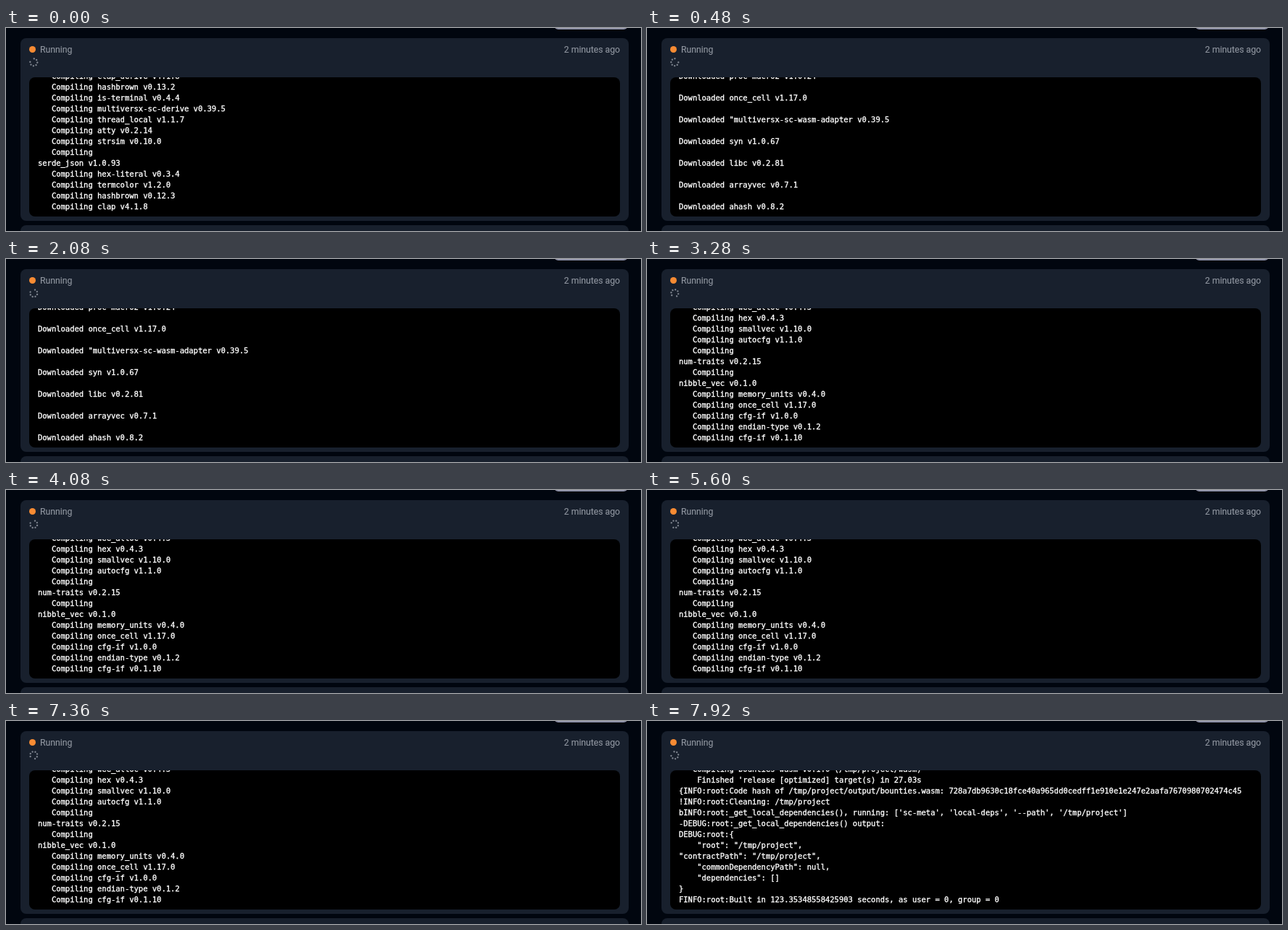
An HTML page that plays this animation: 876 by 280 pixels, repeating every 8000 ms.

```html
<!DOCTYPE html>
<html lang="en">
<head>
<meta charset="utf-8">
<title>Build log</title>
<style>
  html, body { margin: 0; width: 100%; height: 100%; overflow: hidden; background: #01060f; }
  body { position: relative; }
  div, svg, pre { position: absolute; }
  .card { left: 20px; width: 839px; border-radius: 8px; background: #18202d; }
  .label { top: 22px; font: 12.2px/16px Roboto, sans-serif; color: #8f959f; -webkit-text-stroke: .15px; white-space: nowrap; }
  .button { left: 756px; top: -24px; width: 102px; height: 26px; border-radius: 6px; background: #9193a8; }
  .dot { left: 31.8px; top: 24.6px; width: 9.6px; height: 9.6px; border-radius: 50%; background: #f78b33; }
  .terminal { left: 32px; top: 68px; width: 815px; height: 192px; border-radius: 8px; background: #000; overflow: hidden; }
  pre { left: 12px; bottom: 6px; margin: 0; font: 10.49px/15px "DejaVu Sans Mono", monospace; color: #fff; -webkit-text-stroke: .35px; }
</style>
</head>
<body>
<div class="button"></div>
<div class="card" style="top:14px;height:252px"></div>
<div class="card" style="top:272px;height:40px"></div>
<div class="dot"></div>
<div class="label" style="left:47px">Running</div>
<div class="label" style="right:29px">2 minutes ago</div>
<svg width="876" height="280" style="left:0;top:0"><g id="spinner" fill="#7d838e"></g></svg>
<div class="terminal"><pre id="log"></pre></div>
<script>
const LOOP = 8000, STEP = 80, TURN = 2000;
const spinner = document.getElementById('spinner');
const log = document.getElementById('log');

const compiling = items => items.map(s => s[0] === '>'
  ? '   Compiling\n' + s.slice(1)
  : '   Compiling ' + s).join('\n');
const downloaded = items => items.map(s => 'Downloaded ' + s).join('\n\n');

const screens = [
  [0, compiling(['clap_derive v4.1.8', 'hashbrown v0.13.2', 'is-terminal v0.4.4',
    'multiversx-sc-derive v0.39.5', 'thread_local v1.1.7', 'atty v0.2.14', 'strsim v0.10.0',
    '>serde_json v1.0.93', 'hex-literal v0.3.4', 'termcolor v1.2.0', 'hashbrown v0.12.3',
    'clap v4.1.8'])],
  [480, downloaded(['proc-macro2 v1.0.24', 'once_cell v1.17.0',
    '"multiversx-sc-wasm-adapter v0.39.5', 'syn v1.0.67', 'libc v0.2.81',
    'arrayvec v0.7.1', 'ahash v0.8.2'])],
  [3200, compiling(['wee_alloc v0.4.5', 'hex v0.4.3', 'smallvec v1.10.0', 'autocfg v1.1.0',
    '>num-traits v0.2.15', '>nibble_vec v0.1.0', 'memory_units v0.4.0', 'once_cell v1.17.0',
    'cfg-if v1.0.0', 'endian-type v0.1.2', 'cfg-if v0.1.10'])],
  [7520, `   Compiling bounties-wasm v0.1.0 (/tmp/project/wasm)
    Finished 'release [optimized] target(s) in 27.03s
{INFO:root:Code hash of /tmp/project/output/bounties.wasm: 728a7db9630c18fce40a965dd0cedff1e910e1e247e2aafa7670980702474c45
!INFO:root:Cleaning: /tmp/project
bINFO:root:_get_local_dependencies(), running: ['sc-meta', 'local-deps', '--path', '/tmp/project']
-DEBUG:root:_get_local_dependencies() output:
DEBUG:root:{
    "root": "/tmp/project",
"contractPath": "/tmp/project",
    "commonDependencyPath": null,
    "dependencies": []
}
FINFO:root:Built in 123.35348558425903 seconds, as user = 0, group = 0`]
];

// Seven dots on an eight-place ring; the gap starts at the top.
for (let i = 1; i < 8; i++) {
  const dot = document.createElementNS('http://www.w3.org/2000/svg', 'circle');
  dot.setAttribute('cx', 5 * Math.sin(i * Math.PI / 4));
  dot.setAttribute('cy', -5 * Math.cos(i * Math.PI / 4));
  dot.setAttribute('r', 1.2);
  spinner.append(dot);
}

let shown;
function draw(now) {
  const t = Math.floor(now % LOOP / STEP) * STEP;
  spinner.setAttribute('transform', `translate(38.3 47.2) rotate(${t / TURN * 360 - 40})`);
  const text = screens.findLast(([start]) => t >= start)[1];
  if (text !== shown) log.textContent = shown = text;
}

const begin = performance.now();
function tick() {
  draw(performance.now() - begin);
  requestAnimationFrame(tick);
}
tick();
</script>
</body>
</html>
```
